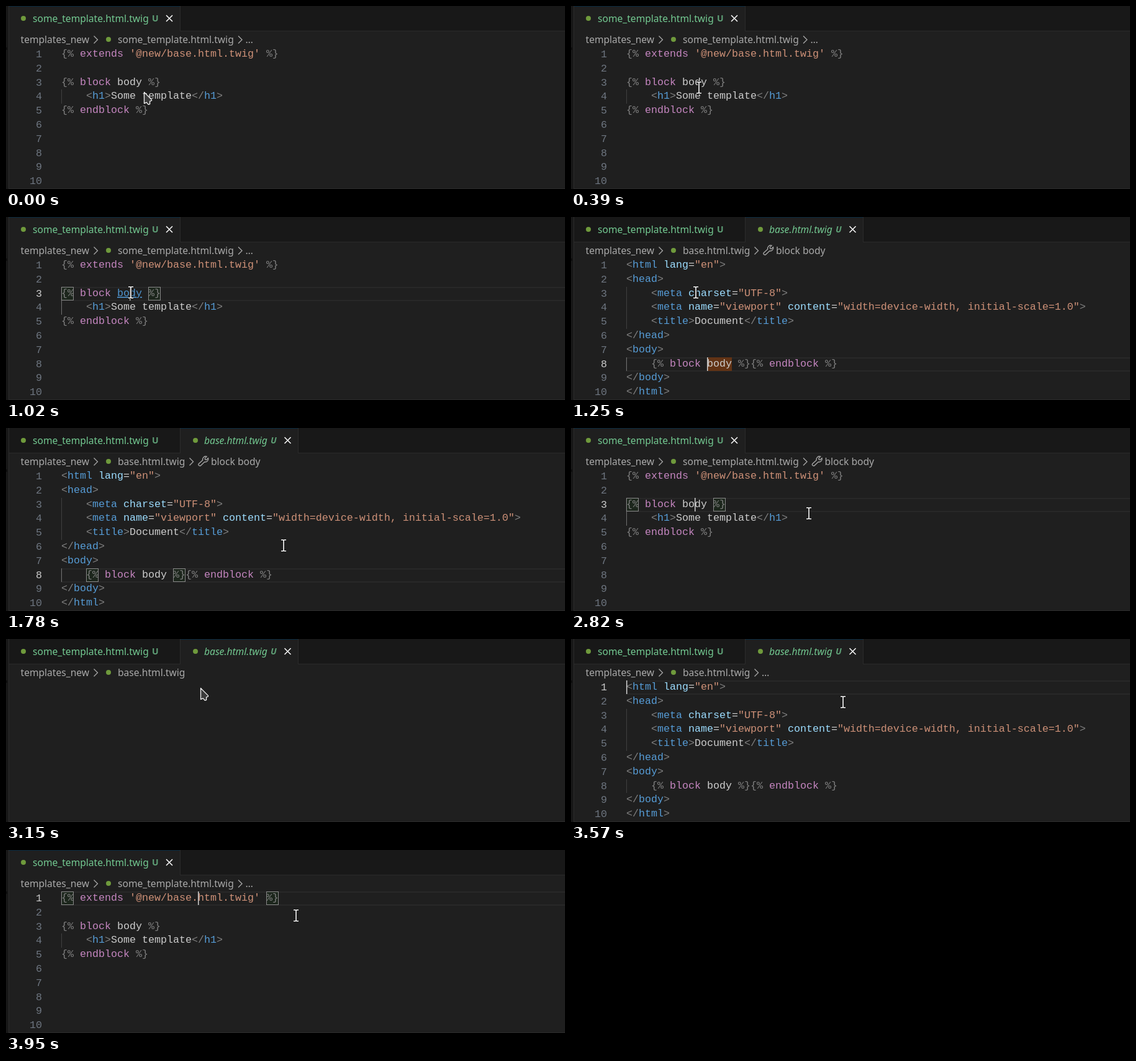
Animation, 900 px wide and 296 px high, one loop 4220 ms. Source, as an HTML page:

```html
<!DOCTYPE html>
<html lang="en">
<head>
<meta charset="utf-8">
<title>Twig go to definition</title>
<style>
  html, body { margin: 0; width: 900px; height: 296px; overflow: hidden; background: #1f1f1f; }
  svg { display: block; }
  text { white-space: pre; }
  .ui { font: 15.6px "Noto Sans", "Open Sans", sans-serif; fill: #a9a9a9; }
  .tab { fill: #73c991; }
  .badge { font-size: 14px; font-weight: 600; fill: #5e9f76; }
  .italic { font-style: italic; }
  .code { font: 16.66px "Liberation Mono", "DejaVu Sans Mono", monospace; fill: #cccccc; }
  .punc { fill: #808080; }
  .str { fill: #ce9178; }
  .tag { fill: #569cd6; }
  .attr { fill: #9cdcfe; }
  .key { fill: #c586c0; }
  .num { fill: #6e7681; text-anchor: end; }
  .num.on { fill: #cccccc; }
  .link3 .name, .link1 .str { fill: #4e94ce; text-decoration: underline; }
  .icon { fill: none; stroke: #a9a9a9; stroke-width: 1.3; }
  .close { fill: none; stroke: #ffffff; stroke-width: 1.5; }
  .edge { fill: #2b2b2b; }
  .match { fill: #006400; fill-opacity: .1; stroke: #888888; }
  .current { fill: none; stroke: #282828; stroke-width: 2; }
</style>
</head>
<body>
<svg id="stage" width="900" height="296" viewBox="0 0 900 296"></svg>
<script>
const LOOP = 4220, LEFT = 89, CHAR = 10, PITCH = 22.8;

const docs = {
  tpl: [
    "{% extends '@new/base.html.twig' %}", "",
    "{% block body %}", "    <h1>Some template</h1>", "{% endblock %}",
    "", "", "", "", ""
  ],
  base: [
    '<html lang="en">', "<head>", '    <meta charset="UTF-8">',
    '    <meta name="viewport" content="width=device-width, initial-scale=1.0">',
    "    <title>Document</title>", "</head>", "<body>",
    "    {% block body %}{% endblock %}", "</body>", "</html>"
  ]
};
const files = {
  tpl: { name: "some_template.html.twig", end: 366.5, guides: [[4, 4]] },
  base: { name: "base.html.twig", end: 288, guides: [[3, 5], [8, 8]] }
};

// Each scene: start time, document, and what the editor shows.
const body3 = { line: 3, col: 11 }, body8 = { line: 8, col: 13, crumb: "block" };
const path1 = { line: 1, col: 22, match: [0, 33] };
const scenes = [
  [0, "tpl", {}],
  [780, "tpl", { link: 3 }],
  [1020, "tpl", { ...body3, match: [0, 14], link: 3, guide: 4 }],
  [1120, "base", { blank: true, arrow: true }],
  [1190, "base", { ...body8, crumb: "more", flash: true, guide: 8 }],
  [1250, "base", { ...body8, flash: true, guide: 8 }],
  [1370, "base", { ...body8, flash: true, guide: 8, match: [4, 18] }],
  [1630, "base", { ...body8, guide: 8, match: [4, 18] }],
  [1700, "base", { ...body8, guide: 8, match: [4, 18], off: true }],
  [2140, "base", { ...body8, guide: 8, match: [4, 18] }],
  [2340, "tpl", { blank: true, arrow: true }],
  [2410, "tpl", { ...body3, crumb: "block", guide: 4, arrow: true }],
  [2490, "tpl", { ...body3, crumb: "block", guide: 4, match: [0, 14], arrow: true }],
  [2550, "tpl", { ...body3, crumb: "block", guide: 4, match: [0, 14] }],
  [2900, "tpl", { ...body3, crumb: "block", guide: 4, match: [0, 14], off: true, link: 1 }],
  [3050, "tpl", { ...path1, link: 1 }],
  [3150, "base", { blank: true, arrow: true }],
  [3260, "base", { line: 1, col: 0 }],
  [3710, "base", { line: 1, col: 0, off: true }],
  [3950, "tpl", path1]
];

// Pointer moves: start, end, number of steps, destination.
const moves = [
  [70, 390, 6, 206, 132],
  [650, 840, 4, 201, 125],
  [1020, 1020, 1, 201, 122],
  [1370, 1520, 3, 425, 176],
  [1630, 1780, 3, 447, 190],
  [2670, 2980, 6, 319, 85],
  [3260, 3710, 7, 467, 106]
];

const rowTop = n => Math.round(66.9 + (n - 1) * PITCH);
const baseline = n => Math.floor(82.4 + (n - 1) * PITCH + 1e-6);
const colX = c => LEFT + c * CHAR;
const esc = s => s.replace(/&/g, "&amp;").replace(/</g, "&lt;");
const rect = (x, y, w, h, attrs) => `<rect x="${x}" y="${y}" width="${w}" height="${h}" ${attrs}/>`;
const text = (x, y, cls, s) => `<text x="${x}" y="${y}" class="${cls}">${s}</text>`;
const dot = (x, y) => `<circle cx="${x}" cy="${y}" r="4" fill="#6f9a3c"/>`;
const chevron = x => `<path class="icon" d="M${x - 3} 48.5l6 6l-6 6"/>`;
const cross = x => `<path class="close" d="M${x - 5} 15l10 10m0 -10l-10 10"/>`;
const wrench = x => `<path class="icon" style="stroke-width:1.1" transform="translate(${x} 44) scale(1.2)"
  d="M2 14C.9 13.2.8 12.4 1.6 11.5L6.8 6.6C6.2 4 8.4 1.3 11.2 1.5L12.2 1.8L9.8 4.3L10.2 6L11.8 6.3L14.2 3.9C15.1 6.8 12.6 9.7 9.2 9.1L4.2 13.9C3.5 14.6 2.7 14.6 2 14Z"/>`;

const TOKEN = /(?<punc>\{%|%\}|<\/?|>)|(?<str>"[^"]*"|'[^']*')|(?<tag>(?<=<\/?)\w+)|(?<attr>\w+(?==))|(?<key>extends|endblock|block)|(?<name>body)/g;

function highlight(line) {
  let out = "", at = 0;
  for (const m of line.matchAll(TOKEN)) {
    const cls = Object.keys(m.groups).find(k => m.groups[k]);
    out += esc(line.slice(at, m.index)) + `<tspan class="${cls}">${esc(m[0])}</tspan>`;
    at = m.index + m[0].length;
  }
  return out + esc(line.slice(at));
}

function tabs(doc) {
  const tpl = doc === "tpl";
  const x = tpl ? 5 : 281, w = tpl ? 275 : 189;
  let out = rect(0, 0, 900, 40, 'fill="#181818"') + rect(5, 40, 895, 1, 'class="edge"') +
    rect(x, 0, w, 41, 'fill="#1f1f1f"') + rect(x, 0, w, 1, 'fill="#08293f"') +
    rect(280, 0, 1, 41, 'class="edge"') +
    dot(28, 20) + text(43, 26, "ui tab", files.tpl.name) + text(235, 25, "ui badge", "U");
  if (tpl) return out + cross(263);
  return out + rect(470, 0, 1, 41, 'class="edge"') + dot(305, 20) +
    text(319, 26, "ui tab italic", files.base.name) + text(426, 25, "ui badge italic", "U") + cross(453.5);
}

function crumbs(doc, s) {
  const { name, end } = files[doc];
  let out = text(23.5, 60, "ui", "templates_new") + chevron(144.5) + dot(165, 54) + text(180, 60, "ui", name);
  if (s.blank) return out;
  out += chevron(end + 10.5);
  return out + (s.crumb === "block"
    ? wrench(end + 20.5) + text(end + 42, 60, "ui", "block body")
    : text(end + 19, 60, "ui", "…"));
}

function editor(doc, s) {
  if (s.blank) return "";
  let out = "";
  if (s.line) out += rect(LEFT, rowTop(s.line) + 1, 820, 21, 'class="current"');
  for (const [a, b] of files[doc].guides)
    out += rect(LEFT, rowTop(a), 1, rowTop(b + 1) - rowTop(a), `fill="${s.guide === a ? "#707070" : "#404040"}"`);
  if (s.flash) out += rect(colX(13), rowTop(8), 40, 22, 'fill="#623315"');
  for (const c of s.match || [])
    out += rect(colX(c) + .5, rowTop(s.line) + .5, 19, 21, 'class="match"');
  docs[doc].forEach((line, i) => {
    const n = i + 1;
    out += text(58, Math.round(82.9 + i * PITCH), "code num" + (n === s.line ? " on" : ""), n) +
      text(LEFT, baseline(n), "code", highlight(line));
  });
  if (s.line && !s.off) out += rect(colX(s.col), rowTop(s.line), 1.5, 22, 'fill="#d0d0d0"');
  return `<g class="link${s.link || 0}">${out}</g>`;
}

const frame = rect(0, 0, 5, 296, 'fill="#181818"') + rect(4, 0, 1, 296, 'class="edge"') +
  rect(0, 67, 2, 4, 'fill="#0c0c0c"') + rect(5, 295, 895, 1, 'class="edge"');
const beam = "M-4 -9h3l1 1l1 -1h3M0 -8v16M-4 9h3l1 -1l1 1h3";

stage.innerHTML = `<g id="view"></g><g id="pointer">
  <path id="arrow" d="M-5.5 -5.5L6.5 6.6V8L3.6 9.2V13.6L1.2 14.4L-1.8 10.8L-5.5 12.6Z"
    fill="#3c3c3c" stroke="#f2f2f2" stroke-width="1.3" stroke-linejoin="round"/>
  <g id="ibeam" fill="none"><path d="${beam}" stroke="#111" stroke-width="3.4"/>
  <path d="${beam}" stroke="#fff" stroke-width="1.6"/></g></g>`;
const [view, pointer, arrow, ibeam] = ["view", "pointer", "arrow", "ibeam"].map(id => document.getElementById(id));

function pointerAt(t) {
  let x = 228, y = 145;
  for (const [from, to, count, toX, toY] of moves) {
    if (t < from) break;
    const step = to > from ? Math.floor((t - from) / (to - from) * (count - 1)) + 1 : count;
    const p = Math.min(1, step / count), e = p * p * (3 - 2 * p);
    x += (toX - x) * e;
    y += (toY - y) * e;
  }
  return [x, y];
}

let shown = null;
function draw(t) {
  const scene = scenes.findLast(s => s[0] <= t);
  const [, doc, s] = scene;
  if (scene !== shown) {
    view.innerHTML = tabs(doc) + crumbs(doc, s) + editor(doc, s) + frame;
    shown = scene;
  }
  const isArrow = s.arrow || t < 70;
  arrow.style.display = isArrow ? "" : "none";
  ibeam.style.display = isArrow ? "none" : "";
  pointer.setAttribute("transform", `translate(${pointerAt(t).map(Math.round)})`);
}

const start = performance.now();
function tick() {
  draw((performance.now() - start) % LOOP);
  requestAnimationFrame(tick);
}
draw(0);
requestAnimationFrame(tick);
</script>
</body>
</html>
```
